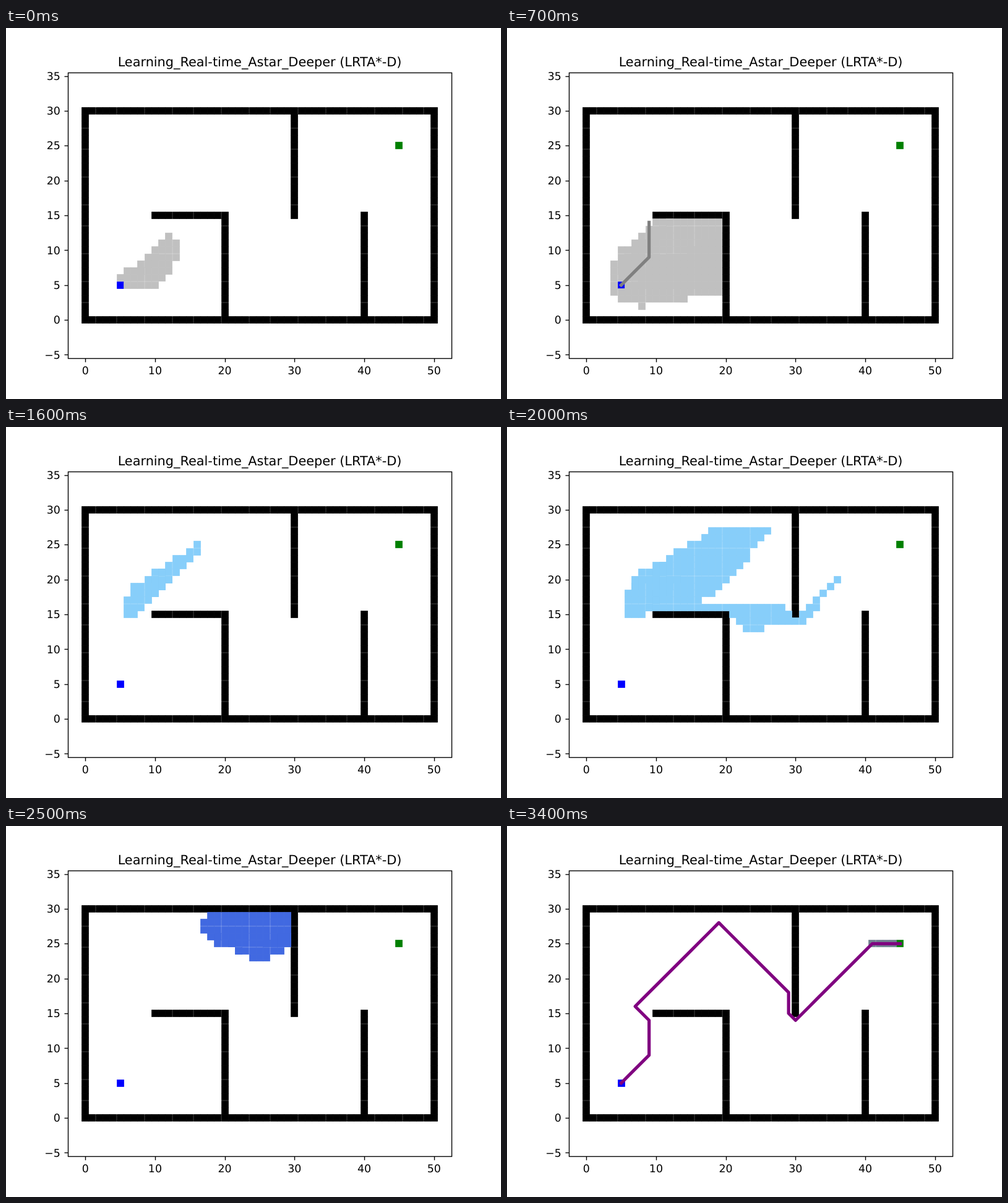
An HTML page with a canvas for the animation above (3500 ms loop, 800x600 px).

```html
<!DOCTYPE html>
<html lang="en">
<head>
<meta charset="utf-8">
<title>LRTA*-D grid search</title>
<style>
  html, body { margin: 0; width: 100%; height: 100%; overflow: hidden; background: #fff; }
  canvas, svg { position: absolute; left: 0; top: 0; width: 800px; height: 600px; }
  text { font-family: "DejaVu Sans", sans-serif; font-size: 17.36px; text-rendering: geometricPrecision; }
  .title { font-size: 20.83px; text-anchor: middle; }
  .x { text-anchor: middle; }
  .y { text-anchor: end; }
  .axis { fill: none; stroke: #000; stroke-width: 1.39; }
</style>
</head>
<body>
<canvas id="grid" width="800" height="600"></canvas>
<svg id="axes" viewBox="0 0 800 600">
  <rect class="axis" x="100.5" y="72.5" width="620" height="462"/>
  <text class="title" x="410" y="61.6">Learning_Real-time_Astar_Deeper (LRTA*-D)</text>
</svg>
<script>
const STEP = 100, LOOP = 3500, BATCH = 40, LIMIT = 250;
const ROWS = 31, COLS = 51, UNIT = 620 / 55;
const COLORS = ['silver', 'wheat', 'lightskyblue', 'royalblue', 'slategray'];

// A cell is one number, so numeric order is column-then-row order.
const cell = (x, y) => x * ROWS + y;
const col = c => Math.floor(c / ROWS);
const row = c => c % ROWS;
const px = x => 410 + (x - 25) * UNIT;
const py = y => 303 + (15 - y) * UNIT;

const START = cell(5, 5), GOAL = cell(45, 25);
const MOVES = [[-1, 0], [-1, 1], [0, 1], [1, 1], [1, 0], [1, -1], [0, -1], [-1, -1]]
  .map(([x, y]) => ({ by: cell(x, y), cost: Math.sqrt(x * x + y * y) }));

const walls = new Set();
function wall(x0, y0, x1, y1) {
  for (let x = x0; x <= x1; x++)
    for (let y = y0; y <= y1; y++) walls.add(cell(x, y));
}
wall(0, 0, 50, 0);
wall(0, 30, 50, 30);
wall(0, 0, 0, 30);
wall(50, 0, 50, 30);
wall(10, 15, 20, 15);
wall(20, 0, 20, 14);
wall(30, 15, 30, 29);
wall(40, 0, 40, 15);

const neighbours = c => MOVES
  .map(m => ({ to: c + m.by, cost: m.cost }))
  .filter(n => !walls.has(n.to));

function distance(c) {
  const dx = 45 - col(c), dy = 25 - row(c);
  return Math.sqrt(dx * dx + dy * dy);
}

// A* that gives up after LIMIT expansions; stale queue entries count too.
function explore(start, h) {
  const open = [[h[start], start]], closed = [], done = new Set();
  const g = new Map([[start, 0]]), parent = new Map();
  while (open.length && closed.length < LIMIT) {
    open.sort((a, b) => a[0] - b[0] || a[1] - b[1]);
    const s = open.shift()[1];
    closed.push(s);
    done.add(s);
    if (s === GOAL) {
      const route = [s];
      while (route[0] !== start) route.unshift(parent.get(route[0]));
      return { closed, done, route };
    }
    for (const { to, cost } of neighbours(s)) {
      const next = g.get(s) + cost;
      if (done.has(to) || next >= (g.get(to) ?? Infinity)) continue;
      g.set(to, next);
      parent.set(to, s);
      open.push([next + h[to], to]);
    }
  }
  return { closed, done, route: null };
}

function learn(done, h) {
  for (const s of done) h[s] = Infinity;
  let changed = true;
  while (changed) {
    changed = false;
    for (const s of done) {
      const best = Math.min(...neighbours(s).map(n => n.cost + h[n.to]));
      if (best !== h[s]) {
        h[s] = best;
        changed = true;
      }
    }
  }
}

// Walk downhill until the explored region is left.
function descend(start, done, h) {
  const route = [start];
  let s = start;
  while (done.has(s) && route.length < 200) {
    s = neighbours(s).reduce((a, b) => h[b.to] < h[a.to] ? b : a).to;
    route.push(s);
  }
  return route;
}

function buildScenes() {
  const h = Array.from({ length: ROWS * COLS }, (_, c) => distance(c));
  const scenes = [], whole = [];
  let start = START;
  for (const color of COLORS) {
    const { closed, done, route: found } = explore(start, h);
    if (!found) learn(done, h);
    const route = found || descend(start, done, h);
    const cells = closed.filter(c => c !== START && c !== GOAL);
    for (let n = BATCH; n < cells.length + BATCH; n += BATCH)
      scenes.push({ cells: cells.slice(0, n), color });
    scenes.push({ cells, color, route, ink: 'gray' });
    whole.push(...route);
    if (found) {
      scenes.push({ cells, color, route: whole, ink: 'purple' });
      break;
    }
    start = route[route.length - 1];
  }
  return scenes;
}

const ctx = document.getElementById('grid').getContext('2d');
const HALF = 5.868;

function mark(c, color) {
  ctx.fillStyle = color;
  ctx.fillRect(Math.round(px(col(c))) - HALF, Math.round(py(row(c))) - HALF, 2 * HALF, 2 * HALF);
}

function draw({ cells, color, route, ink }) {
  ctx.clearRect(0, 0, 800, 600);
  mark(START, 'blue');
  mark(GOAL, 'green');
  walls.forEach(c => mark(c, 'black'));
  cells.forEach(c => mark(c, color));
  if (!route) return;
  ctx.strokeStyle = ink;
  ctx.lineWidth = 5.21;
  ctx.lineCap = 'square';
  ctx.lineJoin = 'round';
  ctx.beginPath();
  route.forEach(c => ctx.lineTo(px(col(c)), py(row(c))));
  ctx.stroke();
}

function buildAxes() {
  const label = n => String(n).replace('-', '\u2212');
  let out = '';
  for (let n = 0; n <= 50; n += 10) {
    out += `<path class="axis" d="M${Math.round(px(n)) + 0.5} 534.5v6"/>
      <text class="x" x="${px(n)}" y="560">${label(n)}</text>`;
  }
  for (let n = -5; n <= 35; n += 5) {
    out += `<path class="axis" d="M100.5 ${Math.round(py(n)) + 0.5}h-6"/>
      <text class="y" x="87.8" y="${Math.round(py(n) + 6.2)}">${label(n)}</text>`;
  }
  document.getElementById('axes').insertAdjacentHTML('beforeend', out);
}

buildAxes();
const scenes = buildScenes();
let shown = -1;

function tick() {
  const now = Math.floor(performance.now() % LOOP / STEP);
  const index = Math.min(now, scenes.length - 1);
  if (index !== shown) draw(scenes[shown = index]);
  requestAnimationFrame(tick);
}
tick();
</script>
</body>
</html>
```
